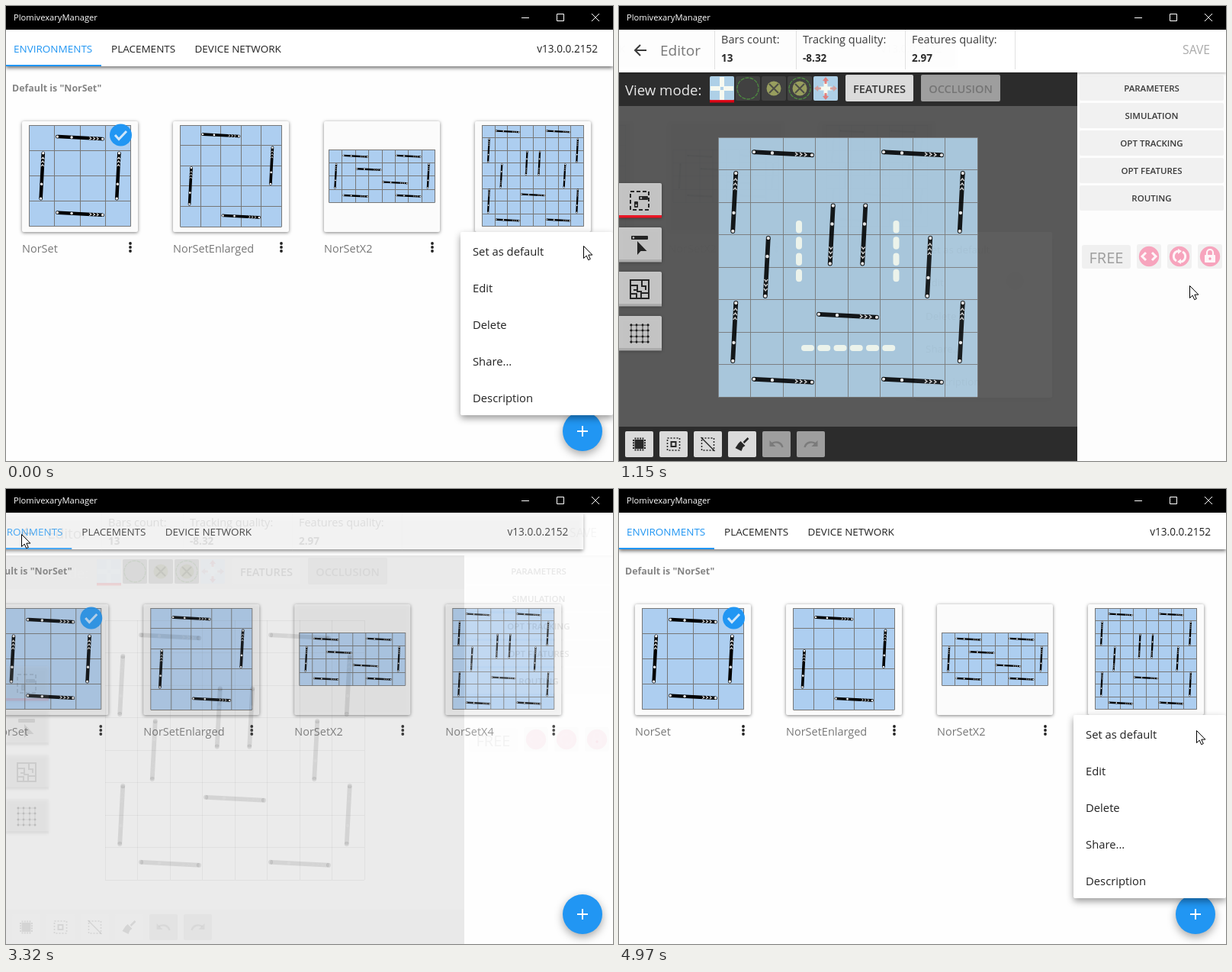
Write an HTML page with a canvas that moves like this. It is 796x596 px and loops after 5.37 s.

```html
<!DOCTYPE html>
<html lang="en">
<head>
<meta charset="utf-8">
<title>Environment manager</title>
<style>
html, body { margin: 0; width: 100%; height: 100%; overflow: hidden; background: #fff; }
canvas { display: block; }
</style>
</head>
<body>
<canvas id="stage" width="796" height="596"></canvas>
<script>
const ctx = document.getElementById('stage').getContext('2d');
const LOOP = 5370, STEP = 70;
const BLUE = '#2196f3', SKY = '#bfe5ff';
const clamp = (v, lo, hi) => Math.min(hi, Math.max(lo, v));
const outPower = (u, p) => 1 - (1 - clamp(u, 0, 1)) ** p;
const inOutPower = (u, p) => u < .5 ? (2 * u) ** p / 2 : 1 - (2 - 2 * u) ** p / 2;
const stepsDone = (t, start, count) => clamp(Math.floor((t - start) / STEP) + 1, 0, count);

// Drawing helpers
function at(x, y, draw, scale = 1, degrees = 0) {
  ctx.save();
  ctx.translate(x, y);
  ctx.rotate(degrees * Math.PI / 180);
  ctx.scale(scale, scale);
  draw();
  ctx.restore();
}
function withAlpha(alpha, draw) {
  ctx.save();
  ctx.globalAlpha = alpha;
  draw();
  ctx.restore();
}
function rect(x, y, w, h, color, radius = 0) {
  ctx.fillStyle = color;
  ctx.beginPath();
  ctx.roundRect(x, y, w, h, radius);
  ctx.fill();
}
function circle(x, y, r, color) {
  ctx.fillStyle = color;
  ctx.beginPath();
  ctx.arc(x, y, r, 0, 7);
  ctx.fill();
}
function fill(d, color) {
  ctx.fillStyle = color;
  ctx.fill(new Path2D(d));
}
function line(d, color, width = 1, dash = []) {
  ctx.strokeStyle = color;
  ctx.lineWidth = width;
  ctx.setLineDash(dash);
  ctx.stroke(new Path2D(d));
  ctx.setLineDash([]);
}
function ring(x, y, r, color, width, dash) {
  line(`M${x + r} ${y}A${r} ${r} 0 1 1 ${x - r} ${y}A${r} ${r} 0 1 1 ${x + r} ${y}`, color, width, dash);
}
function text(str, x, y, size, color, weight = 400, align = 'left') {
  ctx.font = `${weight} ${size}px "Open Sans", sans-serif`;
  ctx.textAlign = align;
  ctx.fillStyle = color;
  ctx.fillText(str, x, y);
}
function shadowed(blur, dy, alpha, draw) {
  ctx.save();
  ctx.shadowColor = `rgba(0,0,0,${alpha})`;
  ctx.shadowBlur = blur;
  ctx.shadowOffsetY = dy;
  draw();
  ctx.restore();
}
// A white sheet whose shadow does not show through while it fades
function sheet(x, y, w, h, blur, dy, alpha, radius = 0) {
  ctx.save();
  ctx.beginPath();
  ctx.rect(-999, -999, 2999, 2999);
  ctx.roundRect(x, y, w, h, radius);
  ctx.clip('evenodd');
  shadowed(blur, dy, alpha, () => rect(x, y, w, h, '#fff', radius));
  ctx.restore();
  rect(x, y, w, h, '#fff', radius);
}

// Boards: a bar is [column, row, direction] in cell units
const RIGHT = 3, DOWN = 93, UP = -87;
const boards = [
  { name: 'NorSet', y: 156, cols: 4, rows: 4, cell: 33.2,
    bars: [[2, .5, RIGHT], [.5, 2, UP], [3.5, 2, UP], [2, 3.5, RIGHT]] },
  { name: 'NorSetEnlarged', y: 156, cols: 5, rows: 5, cell: 26.6,
    bars: [[2, .5, RIGHT], [4.5, 2, UP], [.5, 3, UP], [3, 4.5, RIGHT]] },
  { name: 'NorSetX2', y: 188, cols: 8, rows: 4, cell: 17.35,
    bars: [[2, .5, RIGHT], [6, .5, RIGHT], [.5, 2, UP], [7.5, 2, UP],
           [3, 1.5, RIGHT], [5, 2.5, RIGHT], [2, 3.5, RIGHT], [6, 3.5, RIGHT]] },
  { name: 'NorSetX4', y: 156, cols: 8, rows: 8, cell: 16.6,
    bars: [[2, .5, RIGHT], [6, .5, RIGHT], [.5, 2, UP], [7.5, 2, UP], [3.5, 3, DOWN],
           [4.5, 3, DOWN], [1.5, 4, DOWN], [6.5, 4, UP], [.5, 6, UP], [7.5, 6, UP],
           [4, 5.5, RIGHT], [2, 7.5, RIGHT], [6, 7.5, RIGHT]] }
];
function drawBar() {
  rect(-39, -2.9, 78, 5.8, '#000', 2.5);
  for (const x of [-38, 38]) {
    circle(x, 0, 3, '#000');
    circle(x, 0, 2.1, '#fff');
  }
  circle(-14, 0, 2.2, '#fff');
  for (const x of [16, 22, 28]) line(`M${x} -2.3l3 2.3l-3 2.3`, '#eee', 1.4);
}
function drawBoard({ cols, rows, bars }, x, y, cell, lineColor) {
  const w = cols * cell, h = rows * cell;
  let grid = '';
  for (let c = 0; c <= cols; c++) grid += `M${Math.floor(x + c * cell) + .5} ${y}v${h}`;
  for (let r = 0; r <= rows; r++) grid += `M${x} ${Math.floor(y + r * cell) + .5}h${w}`;
  line(grid, lineColor);
  for (const [c, r, angle] of bars) at(x + c * cell, y + r * cell, drawBar, cell / 42.5, angle);
}

function drawHome() {
  shadowed(5, 2, .6, () => rect(0, 31, 796, 48, '#fff'));
  text('ENVIRONMENTS', 10, 61, 13.5, BLUE);
  text('PLACEMENTS', 138, 61, 13.5, '#222');
  text('DEVICE NETWORK', 247.5, 61, 13.5, '#222');
  text('v13.0.0.2152', 776, 61, 13.6, '#222', 400, 'right');
  rect(0, 77, 125, 2, BLUE);
  text('Default is "NorSet"', 8, 112, 12.4, '#858585', 700);
  boards.forEach((board, i) => {
    const x = 21 + 198 * i, { cols, rows, cell, y } = board;
    const left = x + 76 - cols * cell / 2;
    shadowed(4, 1, .5, () => rect(x, 151, 152, 145, '#fbfbfb', 2));
    rect(left, y, cols * cell, rows * cell, '#adcef0');
    drawBoard(board, left, y, cell, '#777');
    text(board.name, x, 323, 14.5, '#777');
    for (const dotY of [311, 316, 321]) circle(x + 142, dotY, 1.9, '#222');
  });
  circle(150.5, 169, 14.5, BLUE);
  line('M143 169l5 5.5l10 -10.5', '#cfe6fb', 3);
}

function drawFab() {
  shadowed(12, 4, .35, () => circle(756, 557, 26, BLUE));
  line('M749 557h14M756 550v14', '#fff', 2);
}

function drawModeIcon(i) {
  const x = 119 + 34 * i;
  rect(x, 92, 32, 32, i % 4 ? '#444' : SKY, 2);
  at(x + 16, 108, () => {
    if (i === 0) {
      line('M-15 0h30M0 -15v30', '#fffef0', 6, [13, 4]);
      rect(-16, 15, 32, 3.5, '#f00011');
    }
    if (i === 1 || i === 3) ring(0, 0, 14, '#4f9440', 1.3, [5, 1.2]);
    if (i === 2 || i === 3) {
      circle(0, 0, 9.5, '#a4aa62');
      line('M-6 -6l12 12M6 -6l-12 12', '#444', 2);
    }
    if (i === 4) {
      line('M-8 0h16M0 -8v16', '#fffef0', 5);
      for (let k = 0; k < 4; k++) at(0, 0, () => {
        fill('M15 0l-5 -4v2.5h-4v3h4v2.5z', k % 2 ? '#e5736e' : '#d99a94');
      }, 1, 90 * k);
    }
  });
}

const toolIcons = [
  () => {
    line('M-12 -12h24v24h-24z', '#111', 2, [5, 3]);
    rect(-1, -6, 12, 5, '#111', 1);
    rect(-7, 1, 5, 8, '#111', 1);
    circle(2, -3.5, 1.2, '#ddd');
    circle(-4.5, 6, 1.2, '#ddd');
  },
  () => {
    rect(-11, -12, 22, 5, '#111', 1);
    circle(-8, -9.5, 1.2, '#ddd');
    fill('M-3 -5v18l4.5 -5h8z', '#111');
  },
  () => line('M-12 -12h24v24h-24zM-12 -5h9v6h-5M3 -12v8h5v5M-12 6h8v6M2 12v-9h-6M2 5h10', '#111', 2),
  () => {
    const marks = [-11, -4, 4, 11];
    for (const m of marks) line(`M${m} -13v26M-13 ${m}h26`, '#333');
    for (const x of marks) for (const y of marks) circle(x, y, 1.4, '#111');
  }
];
const undo = color => {
  line('M-6 -1C-1 -4 6 -3 8 4', color, 2.4);
  fill('M-9 -5v8h8z', color);
};
const actionIcons = [
  () => {
    rect(-6, -6, 12, 12, '#111');
    line('M-6 -7.5h12M-6 7.5h12M-7.5 -6v12M7.5 -6v12', '#111', 2, [2, 1.3]);
  },
  () => {
    line('M-8 -8h16v16h-16z', '#111', 1.6, [2, 2]);
    line('M-3 -3h6v6h-6z', '#111', 2);
  },
  () => {
    line('M-8 -8h16v16h-16z', '#111', 1.5, [2, 2]);
    line('M-9 -9l18 18', '#111', 1.5);
  },
  () => {
    line('M8 -8l-6 6', '#111', 2.5);
    fill('M-2 -4l6 6l-3 2l-6 -5zM-5 -1l6 5l-2 5l-8 -4z', '#111');
  },
  () => undo('#777'),
  () => { ctx.scale(-1, 1); undo('#777'); }
];
const pinkIcons = [
  () => line('M-4 -5l-5 5l5 5M4 -5l5 5l-5 5', '#fff', 3),
  () => {
    line('M-2 -7a7 7 0 0 0 -2 13M2 7a7 7 0 0 0 2 -13', '#fff', 3);
    fill('M-2 -10l5 3l-5 4zM2 10l-5 -3l5 -4z', '#fff');
  },
  () => {
    rect(-7, -2, 14, 10, '#fff', 1);
    line('M-4 -2v-3a4 4 0 0 1 8 0v3', '#fff', 2.2);
    circle(0, 3, 1.7, '#f48fae');
  }
];

// Large surfaces fade in later than the controls on them
function drawEditor(shown) {
  rect(0, 87, 601, 509, '#444');
  rect(601, 87, 195, 509, '#fdfdfd');
  withAlpha(shown ** 2, () => {
    rect(0, 87, 601, 44, '#212121');
    rect(0, 551, 601, 45, '#212121');
    rect(130, 172, 340, 340, SKY);
    for (const x of [236, 363.5])
      for (let k = 0; k < 4; k++) rect(x - 4, 281 + 21.25 * k, 8, 16.5, '#fffff0', 4);
    for (let k = 0; k < 6; k++) rect(239 + 21.25 * k, 444, 17, 8, '#fffff0', 4);
  });
  drawBoard(boards[3], 130, 172, 42.5, '#777');

  text('View mode:', 8, 117, 18.6, '#fff');
  for (let i = 0; i < 5; i++) drawModeIcon(i);
  rect(297, 90, 89, 35, '#f2f2f2', 2);
  text('FEATURES', 341.5, 114, 14.6, '#222', 600, 'center');
  rect(396, 90, 104, 35, '#adadad', 2);
  text('OCCLUSION', 448, 114, 14.6, '#707070', 600, 'center');

  toolIcons.forEach((draw, i) => {
    const y = 232 + 58 * i;
    shadowed(4, 1, .4, () => rect(0, y, 56, 45, '#d6d6d6', [0, 2, 2, 0]));
    rect(0, y + 42, 56, 3.5, i ? '#a9a9a9' : '#f00011');
    at(27, y + 23, draw);
  });
  actionIcons.forEach((draw, i) => {
    const x = 8 + 45 * i;
    rect(x, 557, 37, 34, i < 4 ? '#f2f2f2' : '#adadad', 2);
    at(x + 18.5, 574, draw);
  });

  ['PARAMETERS', 'SIMULATION', 'OPT TRACKING', 'OPT FEATURES', 'ROUTING'].forEach((label, i) => {
    rect(604, 91 + 36 * i, 189, 33, '#f0f0f0', 2);
    text(label, 698.5, 112 + 36 * i, 11.5, '#222', 600, 'center');
  });
  rect(607, 313, 64, 31, '#efefef', 3);
  text('FREE', 639, 337, 20, '#929292', 500, 'center');
  pinkIcons.forEach((draw, i) => {
    rect(679 + 40 * i, 312, 32, 32, '#efefef', 3);
    circle(695 + 40 * i, 328, 13.2, '#f79ab6');
    at(695 + 40 * i, 328, draw);
  });

  sheet(0, 31, 796, 56, 4, 1, .35);
  line('M36 58H22M28 51l-7 7l7 7', '#222', 2);
  text('Editor', 54, 65, 19, '#666');
  for (const x of [125, 232, 375, 519]) rect(x, 31, 1, 52, '#ddd');
  [[134, 'Bars count:', '13'], [241, 'Tracking quality:', '-8.32'], [384, 'Features quality:', '2.97']]
    .forEach(([x, label, value]) => {
      text(label, x, 49, 14.5, '#222');
      text(value, x, 73, 13.5, '#111', 700);
    });
  text('SAVE', 775, 63, 15.7, '#9f9f9f', 400, 'right');
}

function drawMenu(x, scale, closing) {
  at(x + 100, 296, () => {
    sheet(-100, 0, 200, 240, 10, 4, .4, 3);
    if (closing) {
      rect(-100, 48, 200, 48, 'rgba(0,0,0,.05)');
      circle(46, 71, 13.5, 'rgba(0,0,0,.1)');
    }
    ['Set as default', 'Edit', 'Delete', 'Share...', 'Description']
      .forEach((label, i) => text(label, -84, 31 + 48 * i, 14.8, '#222'));
  }, scale);
}

function drawTitleBar() {
  rect(0, 0, 796, 31, '#000');
  text('PlomivexaryManager', 10, 19, 11.2, '#fff');
  line('M676 15.5h10M722.5 10.5h9v9h-9zM768 10l10 10M778 10l-10 10', '#fff');
}

// [start time, steps, easing power, from x, from y, to x, to y]
const moves = [
  [200, 7, 3, 757, 314, 748, 366],
  [2140, 15, 3.3, 748, 366, 22, 59],
  [3320, 2, 1, 22, 59, 18, 59],
  [3660, 12, 4.2, 18, 59, 757, 316]
];
function cursorAt(t) {
  const [start, count, power, x0, y0, x1, y1] = moves.findLast(m => t >= m[0]) || moves[0];
  const u = inOutPower(stepsDone(t, start, count) / count, power);
  return [Math.round(x0 + (x1 - x0) * u), Math.round(y0 + (y1 - y0) * u)];
}
function drawCursor(x, y) {
  at(x + .5, y + .5, () => {
    const arrow = 'M0 0V16L3.7 12.6L6.2 18.2L8.8 17L6.3 11.6H11.4Z';
    fill(arrow, '#fff');
    line(arrow, '#000');
  });
}

function render(t) {
  const pushed = stepsDone(t, 1080, 3), popped = stepsDone(t, 3320, 3);
  const pushTime = pushed ? 33 + STEP * (pushed - 1) : 0;
  const popTime = popped ? 108 + STEP * (popped - 1) : 0;
  const entered = pushed === 3 ? 1 : outPower(pushTime / 200, 3);
  const away = entered * (1 - outPower(popTime / 200, 3));
  const [x, y] = cursorAt(t);

  rect(0, 0, 796, 596, '#fefefe');
  if (away < 1) withAlpha(1 - away, () => at(-398 * away, 0, drawHome));
  if (away > 0) withAlpha(away, () => drawEditor(away));
  if (away < .5) drawFab();

  const opened = stepsDone(t, 4830, 3);
  if (opened) {
    const elapsed = 30 + STEP * (opened - 1);
    withAlpha(outPower(elapsed / 150, 3), () => drawMenu(596, .9 + .1 * outPower(elapsed / 220, 5)));
  } else if (pushed < 3) {
    const closed = outPower(pushTime / 150, 3);
    const menuX = Math.min(596, 730.5 - 398 * away);
    withAlpha(1 - closed, () => drawMenu(menuX, 1 - .1 * closed, pushed > 0));
  }
  drawTitleBar();

  const during = start => t >= start && t < start + STEP;
  if (during(3250)) circle(28, 58, 18, 'rgba(0,0,0,.04)');
  if (during(4760)) circle(757, 316, 20, 'rgba(0,0,0,.04)');
  if ([750, 3250, 4760].some(during)) circle(x - 1, y - .5, 11.5, 'rgba(248,234,55,.75)');
  drawCursor(x, y);
}

const begin = performance.now();
function tick() {
  render((performance.now() - begin) % LOOP);
  requestAnimationFrame(tick);
}
tick();
</script>
</body>
</html>
```
